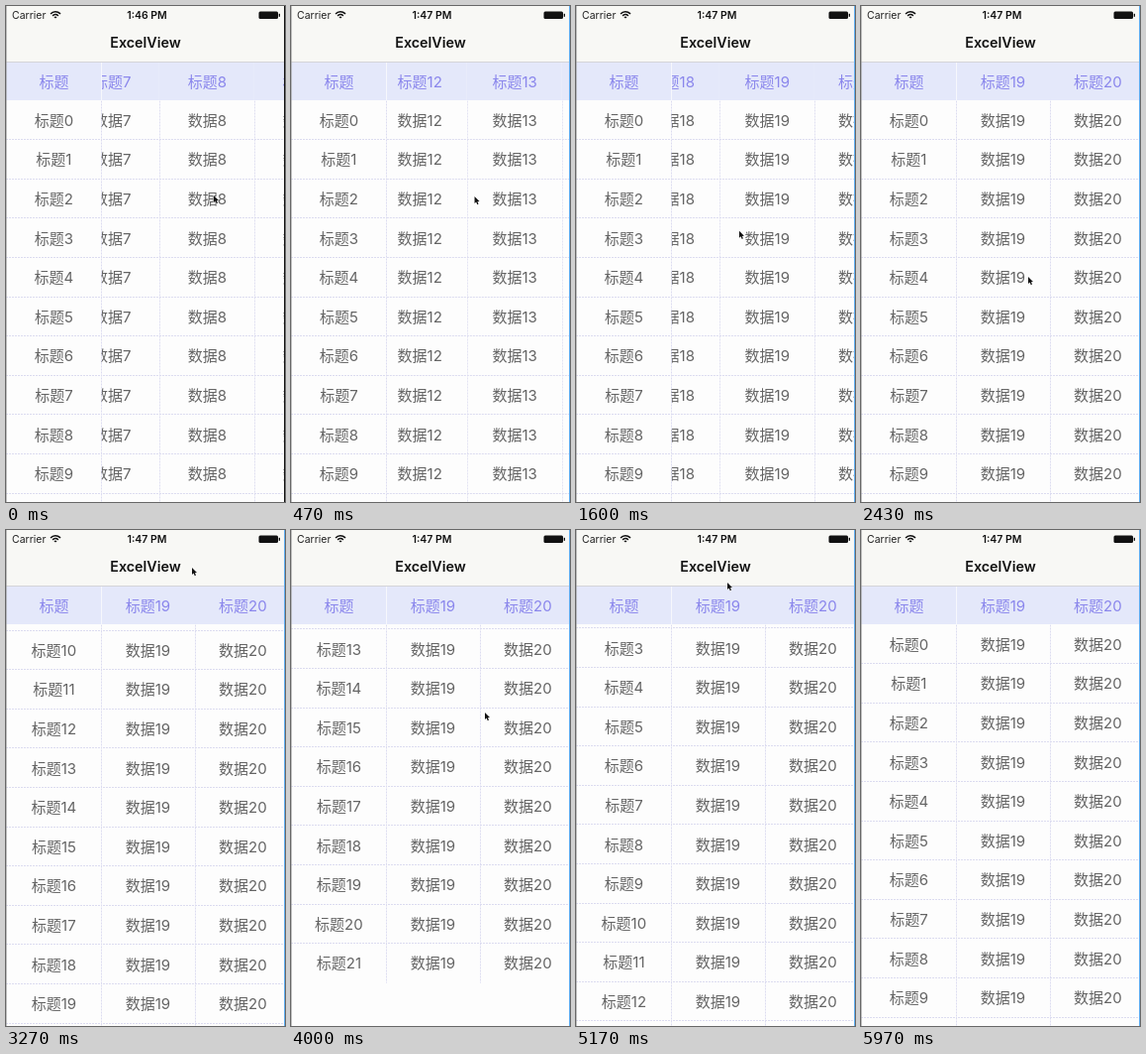
An HTML page with a canvas for the animation above (6.01 s loop, 282x500 px).

```html
<!DOCTYPE html>
<html lang="zh-CN">
<head>
<meta charset="utf-8">
<title>ExcelView</title>
<style>
html, body { margin: 0; width: 100%; height: 100%; overflow: hidden; background: #fdfdfd; }
canvas { display: block; width: 282px; height: 500px; }
</style>
</head>
<body>
<canvas id="stage"></canvas>
<script>
const W = 282, H = 500, LOOP = 6010;
const COL = 96, ROW = 39.6, ROWS = 22, HEAD = 57, TOP = 95.5, EDGE = 281;
const canvas = document.getElementById('stage');
const ctx = canvas.getContext('2d');
const dpr = window.devicePixelRatio || 1;
canvas.width = W * dpr;
canvas.height = H * dpr;

const FONT = 'Inter, "Noto Sans CJK SC", "Noto Sans CJK", sans-serif';
const PAPER = '#fdfdfd', BAR = '#f8f8f5', BAND = '#e4e8fa';
const INK = '#646464', TITLE = '#8a86ec', LINE = '#dcdcf0';

// Eased glide between key points [time, ...values]
function glide(keys, t) {
  const i = keys.findIndex(k => k[0] > t);
  if (i < 0) return keys[keys.length - 1].slice(1);
  if (i === 0) return keys[0].slice(1);
  const [t0, ...a] = keys[i - 1], [t1, ...b] = keys[i];
  const u = (t - t0) / (t1 - t0), e = u * u * (3 - 2 * u);
  return a.map((v, k) => v + (b[k] - v) * e);
}

// Sideways flick that slows evenly to rest
const scrollX = t => 1729 - 1117 * Math.max(0, 1 - t / 2030) ** 2;

// Flick up, pull past the end, spring back, two flicks down
const SCROLL = [[2540, 0], [3270, 390], [3600, 390], [4000, 510], [4400, 467],
  [4500, 467], [5170, 115], [5600, 0]];
const MOUSE = [[0, 210, 191], [930, 162, 193], [2430, 169, 273], [3000, 188, 38],
  [3270, 188, 38], [3600, 194, 284], [4000, 196, 184], [4800, 170, 320],
  [5170, 153, 53], [5800, 150, 510]];

function box(x, y, w, h, color) {
  ctx.fillStyle = color;
  ctx.fillRect(x, y, w, h);
}

function text(s, x, y, size, color, weight = 400, align = 'center') {
  ctx.font = `${weight} ${size}px ${FONT}`;
  ctx.textAlign = align;
  ctx.fillStyle = color;
  ctx.fillText(s, x, y);
}

function dotted(x0, y0, x1, y1) {
  ctx.strokeStyle = LINE;
  ctx.lineWidth = 1;
  ctx.setLineDash([2, 1]);
  ctx.beginPath();
  ctx.moveTo(x0, y0);
  ctx.lineTo(x1, y1);
  ctx.stroke();
  ctx.setLineDash([]);
}

function clip(x, y, w, h, draw) {
  ctx.save();
  ctx.beginPath();
  ctx.rect(x, y, w, h);
  ctx.clip();
  draw();
  ctx.restore();
}

function column(x, label, head, sy) {
  const right = Math.round(x + COL) + 0.5, mid = x + COL / 2 + 0.4;
  box(x, HEAD, COL, TOP - HEAD - 0.5, BAND);
  box(right - 0.5, HEAD, 1, TOP - HEAD, '#f6f7fc');
  text(head, mid, 81.5, 15, TITLE);
  clip(x, TOP, COL + 1, H - TOP, () => {
    for (let r = 0; r < ROWS; r++) {
      const y = TOP + r * ROW - sy;
      if (y < TOP - ROW || y > H) continue;
      text(label(r), mid, y + 25.3, 15, INK);
      const edge = Math.round(y) - 0.5;
      if (r) dotted(x, edge, x + COL, edge);
    }
    dotted(right, TOP, right, Math.min(H, TOP + ROWS * ROW - sy));
  });
}

function wifi(x, y) {
  ctx.strokeStyle = ctx.fillStyle = '#111';
  ctx.lineWidth = 1.5;
  for (const r of [4, 6.8]) {
    ctx.beginPath();
    ctx.arc(x, y, r, -Math.PI * 0.76, -Math.PI * 0.24);
    ctx.stroke();
  }
  ctx.beginPath();
  ctx.moveTo(x, y);
  ctx.arc(x, y, 2, -Math.PI * 0.78, -Math.PI * 0.22);
  ctx.fill();
}

function battery() {
  ctx.fillStyle = '#111';
  ctx.beginPath();
  ctx.roundRect(255.5, 5.5, 19.5, 7.5, 1.5);
  ctx.fill();
  box(275.7, 7.8, 1.3, 3, '#111');
}

function bars(t) {
  box(0, 0, W, 56, BAR);
  box(0, 56, W, 1, '#d4d4d8');
  text('Carrier', 6, 13, 10.5, '#222', 400, 'left');
  wifi(50, 12.6);
  text(t < 400 ? '1:46 PM' : '1:47 PM', 142.5, 13, 10.5, '#111', 600);
  battery();
  text('ExcelView', 141, 42.3, 14.3, '#111', 600);
}

function pointer(x, y) {
  ctx.beginPath();
  [[0, 0], [0, 7], [1.6, 5.6], [2.8, 8.2], [4, 7.6], [2.9, 5.2], [5, 5]]
    .forEach(([dx, dy]) => ctx.lineTo(x + dx, y + dy));
  ctx.closePath();
  ctx.strokeStyle = '#fff';
  ctx.lineWidth = 0.8;
  ctx.stroke();
  ctx.fillStyle = '#111';
  ctx.fill();
}

function draw(t) {
  ctx.setTransform(dpr, 0, 0, dpr, 0, 0);
  box(0, 0, W, H, PAPER);
  const sx = scrollX(t), [sy] = glide(SCROLL, t);
  clip(COL, HEAD, EDGE - COL, H - HEAD, () => {
    const first = Math.floor(sx / COL) + 1;
    for (let c = first; c * COL - sx < EDGE; c++) {
      column(c * COL - sx, () => '数据' + c, '标题' + c, sy);
    }
  });
  column(0, r => '标题' + r, '标题', sy);
  bars(t);
  box(0, 0, 0.6, H, '#9a9a9a');
  box(EDGE, 0, W - EDGE, H, t < 30 ? '#151515' : '#62b0f4');
  pointer(...glide(MOUSE, t));
}

const start = performance.now();
function tick() {
  draw((performance.now() - start) % LOOP);
  requestAnimationFrame(tick);
}
tick();
</script>
</body>
</html>
```
